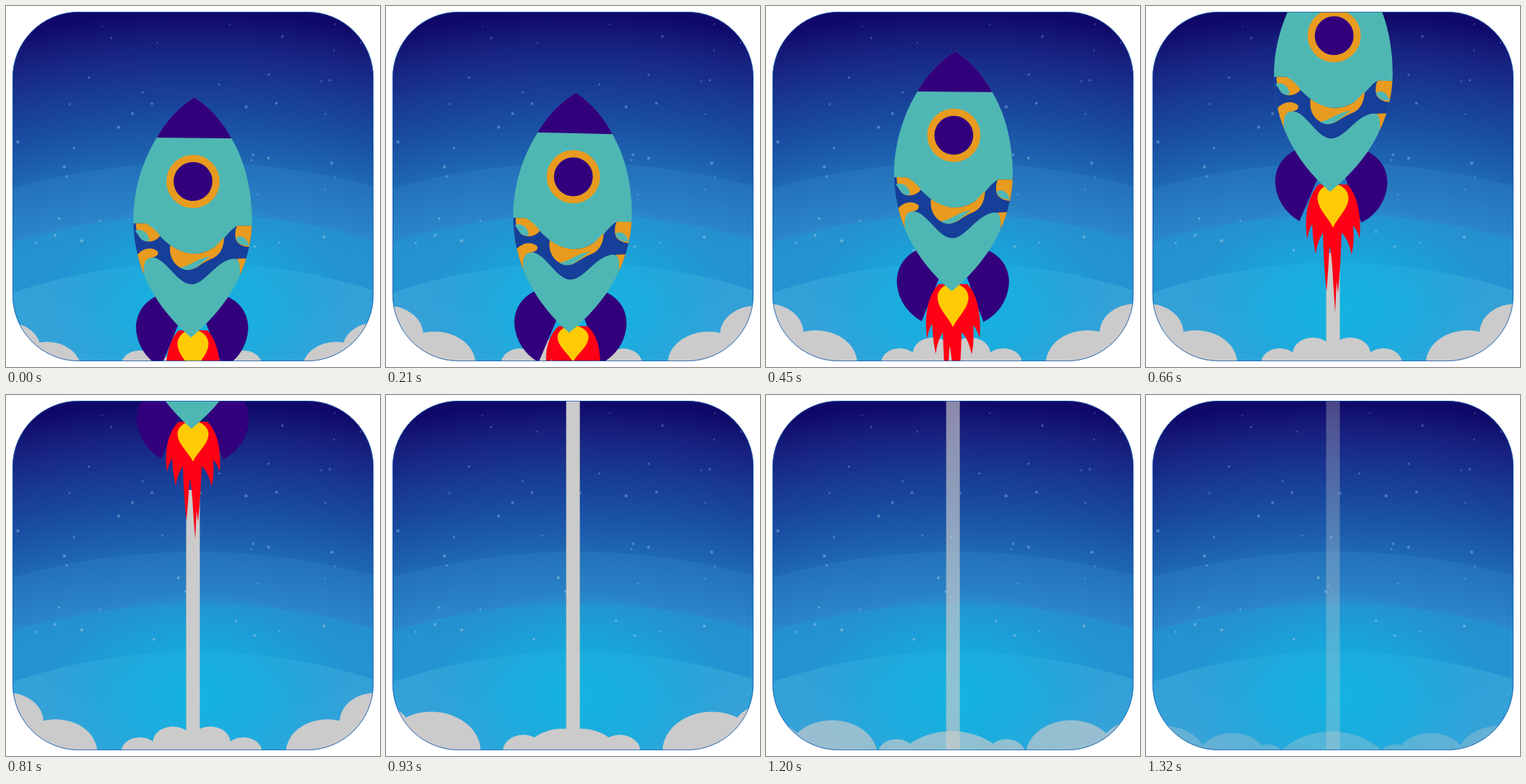
Write an HTML page that moves like this. It is 520 by 502 pixels and loops after 1350 ms.

```html
<!DOCTYPE html>
<html lang="en">
<head>
<meta charset="utf-8">
<title>Rocket launch</title>
<style>
html, body { margin: 0; width: 100%; height: 100%; overflow: hidden; background: #fff; }
svg { display: block; width: 520px; height: 502px; }
</style>
</head>
<body>
<svg viewBox="0 0 520 502">
  <defs>
    <radialGradient id="sky" gradientUnits="userSpaceOnUse" cx="265" cy="1160" r="1160"></radialGradient>
    <radialGradient id="glow">
      <stop offset="0" stop-color="#12b4e2"/>
      <stop offset=".45" stop-color="#12b0e0" stop-opacity=".7"/>
      <stop offset="1" stop-color="#12a8dc" stop-opacity="0"/>
    </radialGradient>
    <clipPath id="card"><rect x="9" y="8" width="502" height="486" rx="92"/></clipPath>
    <clipPath id="hull"><path d="M261 127C237 142 220 163 209 183.5C187 220 177 262 177.5 298C178 365 210 420 259 461C308 420 342 365 342.5 298C342 262 335 220 313 183.5C302 163 285 142 261 127Z"/></clipPath>
  </defs>
  <g clip-path="url(#card)">
    <rect width="520" height="502" fill="url(#sky)"/>
    <ellipse cx="268" cy="420" rx="215" ry="150" fill="url(#glow)"/>
    <g id="stars" fill="#8fc3e4"></g>
    <g id="clouds" fill="#cbcbcb"></g>
    <rect id="trail" x="250.5" width="19" height="502" fill="#cbcbcb"/>
    <g id="rocket">
      <g fill="#32007d" transform="translate(2.5 0)">
        <path d="M208 404C186 415 180 433 180 448C181 472 195 492 215 503L240 440Z"/>
        <path d="M308 404C330 415 336 433 336 448C335 472 322 492 301 503L277 440Z"/>
      </g>
      <g id="flame">
        <path fill="#ff0014" d="M240 451C227 464 219 492 224 527Q226 515 231 506Q232 530 236 548Q238 530 246 518Q247 565 251 600Q254 565 255 537Q258 545 260 582Q261 600 263 629L265 585L267 602Q271 560 272 518Q281 526 286 549Q290 530 288 508Q294 515 297 526C300 492 293 464 280 451Z"/>
        <path fill="#ffcb05" d="M260 450C246 451 238 461 238.500 470C239 485 253 496 260 511C267 496 281 485 281.500 470C282 461 274 451 260 450Z"/>
      </g>
      <g clip-path="url(#hull)">
        <path fill="#4fb7b3" d="M170 120H350V465H170Z"/>
        <path fill="#32007d" d="M170 120H350V183.500H170Z"/>
        <path fill="#163f99" d="M170 303H195C208 311 216 324 232 335Q262 354 291 335C304 326 310 312 322 305H350V375H326C328 358 326 350 316 351C292 355 278 387 259 387C239 387 224 351 204 350C193 350 191 360 193 375H170Z"/>
        <g fill="#e89b1f">
          <path d="M181 303H195Q206 308 215 320C209 329 195 331 188 324Q181 315 181 303Z"/>
          <path d="M180 352C187 337 204 334 212 342Q214 349 203 350.500C193 352 191 362 194 380H180Z"/>
          <path d="M229 333Q262 355 291 335L304 321C304 337 297 348 285 352C271 358 266 367 253 367C237 365 227 351 229 333Z"/>
          <path d="M322 305H346V334C332 336 320 331 319.500 320C319 313 320 308 322 305Z"/>
          <path d="M321 351L340 350L326 382Q328 354 321 351Z"/>
        </g>
        <g fill="#4fb7b3">
          <path d="M180 313C191 309 199 317 200 327Q193 329 188 324Z"/>
          <path d="M243 364C257 362 268 350 285 348C274 355 266 367 253 367Q247 367 243 364Z"/>
          <path d="M320 322C327 317 335 321 339 332Q324 334 320 322Z"/>
        </g>
      </g>
      <circle cx="260" cy="244" r="32" fill="#32007d" stroke="#e89b1f" stroke-width="10"/>
    </g>
  </g>
  <rect x="9.500" y="8.500" width="501" height="485" rx="91.500" fill="none" stroke="#1c5fae" stroke-width=".8"/>
</svg>
<script>
const LOOP = 1350, STEP = 30;
const $ = id => document.getElementById(id);

function set(el, attrs) {
  for (const k in attrs) el.setAttribute(k, attrs[k]);
}
function add(parent, tag, attrs = {}) {
  const el = document.createElementNS('http://www.w3.org/2000/svg', tag);
  set(el, attrs);
  return parent.appendChild(el);
}
const ramp = (t, from, to) => Math.max(0, Math.min(1, (t - from) / (to - from)));

// Sky colours by height on the centre line; repeated heights make the arc edges
[[494, '#37a4da'], [357, '#33a0d7'], [357, '#2394d1'], [290, '#2590cf'], [290, '#2b86c9'],
 [218, '#2371ba'], [218, '#1e68b3'], [160, '#194fa3'], [100, '#183690'], [50, '#171f7d'], [8, '#0f0868']]
  .forEach(([y, c]) => add($('sky'), 'stop', { offset: (1160 - y) / 1160, 'stop-color': c }));

let seed = 7;
const random = () => (seed = seed * 16807 % 2147483647) / 2147483647;
for (let i = 0; i < 48; i++) {
  const y = 25 + 335 * random();
  add($('stars'), 'circle', {
    cx: 15 + 480 * random(), cy: y, r: 1 + 1.3 * random(), opacity: .25 + y / 1000
  });
}

// Left-hand puffs as [x, top, half width], with the change each phase adds
const puffs = [
  { rest: [2, 440, 46], grow: [0, -26, 4], swell: [-35, 30, 0], sink: [23, 46, 10] },
  { rest: [57, 467, 47], grow: [12, -16, 11], swell: [-12, -21, 21], sink: [51, 19, -7] },
  { rest: [186, 479, 26], grow: [0, -3, 0], swell: [10, -7, 5], sink: [-16, 10, -4] },
  { rest: [236, 485, 28], grow: [-4, -24, 0], swell: [26, 6, 57], sink: [26, 7, 62] }
];
for (const p of puffs) p.pair = [-1, 1].map(() => add($('clouds'), 'path'));

function drawPuffs(t) {
  const grow = 1 - (1 - ramp(t, 0, 400)) ** 3;
  const sink = ramp(t, 1050, 1320);
  const swell = ramp(t, 810, 1050) * (1 - sink);
  for (const p of puffs) {
    const [x, y, r] = p.rest.map((v, i) =>
      v + p.grow[i] * grow + p.swell[i] * swell + p.sink[i] * sink);
    const h = r * .8;
    p.pair.forEach((el, i) => {
      const cx = i ? 516 - x : x;
      set(el, { d: `M${cx - r} 520V${y + h}A${r} ${h} 0 0 1 ${cx + r} ${y + h}V520Z` });
    });
  }
}

// Height gained: cubic launch with an extra push late on
const rise = t => 7.05e-7 * t ** 3 + 1.75e-3 * Math.max(0, t - 660) ** 2;

function draw(t) {
  const up = rise(t), drift = t / 400;
  const fade = 1 - ramp(t, 1080, 1430);
  drawPuffs(t);
  set($('clouds'), { opacity: fade });
  set($('trail'), { y: Math.max(0, 546 - up), opacity: fade });

  const tilt = .9 - .4 * Math.cos(2 * Math.PI * t / 450);
  set($('rocket'), {
    transform: `translate(${drift} ${-up}) rotate(${tilt} 260 244)`,
    visibility: t > 960 ? 'hidden' : 'visible'
  });

  // Flame stays upright and dips in length while the engine starts
  const len = 1 - .17 * Math.sin(Math.PI * ramp(t, 0, 420)) - .08 * Math.sin(ramp(t, 660, 960) * Math.PI);
  set($('flame'), {
    transform: `rotate(${-tilt} 260 244) translate(${-drift} 455) scale(1 ${len}) translate(0 -455)`
  });
}

const start = performance.now();
function tick() {
  const t = (performance.now() - start) % LOOP;
  draw(Math.floor(t / STEP) * STEP);
  requestAnimationFrame(tick);
}
draw(0);
requestAnimationFrame(tick);
</script>
</body>
</html>
```
